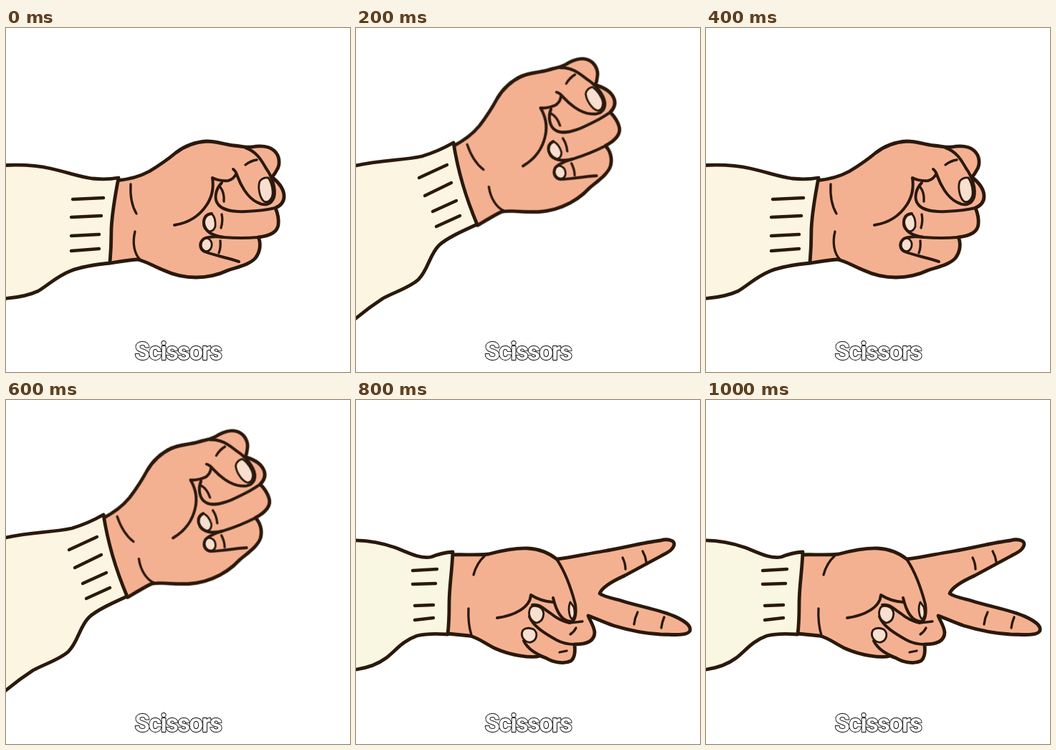
Animation, 480 px wide and 480 px high, one loop 1.2 s. Source, as an HTML page:

```html
<!DOCTYPE html>
<html lang="en">
<head>
<meta charset="utf-8">
<title>Scissors</title>
<style>
html, body { margin: 0; width: 100%; height: 100%; overflow: hidden; background: #fff; }
svg { display: block; width: 100vw; height: 100vh; }
path { fill: none; stroke: #2a190c; stroke-width: 3.3; stroke-linecap: round; stroke-linejoin: round; }
.skin { fill: #f4b192; stroke-width: 4.8; }
.wool { fill: #fcf5e1; stroke-width: 4.8; }
.nail { fill: #f8dfcf; stroke-width: 2.8; }
.bold { stroke-width: 4; }
.thumb { fill: #f4b192; }
.rib { stroke-width: 4.4; }
#open .wool { fill: #f9f6e1; }
#fist { animation: swing 1.2s step-end infinite; }
#low { animation: low 1.2s step-end infinite; }
#high { animation: high 1.2s step-end infinite; }
#open { animation: open 1.2s step-end infinite; }
text {
  font: 700 34.5px Impact, Roboto, sans-serif;
  letter-spacing: -1.6px;
  text-anchor: middle;
  fill: #fff; stroke: #000; stroke-width: 1.8; stroke-linejoin: round; paint-order: stroke;
}
@keyframes swing {
  0%, 33.3333% { transform: none; visibility: visible; }
  16.6667%, 50% { transform: translate(136px, 160.6px) rotate(-22deg) translate(-157px, -209px); visibility: visible; }
  66.6667%, 100% { transform: none; visibility: hidden; }
}
@keyframes low {
  0%, 33.3333% { visibility: visible; }
  16.6667%, 50%, 100% { visibility: hidden; }
}
@keyframes high {
  0%, 33.3333%, 66.6667%, 100% { visibility: hidden; }
  16.6667%, 50% { visibility: visible; }
}
@keyframes open {
  0% { visibility: hidden; }
  66.6667%, 100% { visibility: visible; }
}
</style>
</head>
<body>
<svg viewBox="0 0 480 480">
  <g id="fist">
    <path class="skin" d="M154 213C175 211 189 206 200 200C215 191 225 184 237 174C250 164 265 159 280 158C295 158 305 163 318 164C330 165 335 167 343 166C355 164 367 165 374 171C382 178 383 190 378 198Q375 204 371 208C380 215 388 225 388 235C388 243 383 248 376 251C378 256 381 265 380 274C379 284 370 290 352 292C356 300 355 312 348 321C340 330 325 333 310 338C295 345 280 348 265 348C250 348 235 345 220 338C205 332 195 325 183 323C170 324 158 326 145 328"/>
    <path d="M174 218C173 235 176 249 182 259M180 284C176 300 179 315 187 323"/>
    <path class="bold" d="M235 275C255 272 270 262 280 247C288 235 290 222 288 209Q298 214 310 213Q318 211 322 202"/>
    <path class="bold" d="M301 216C292 225 290 239 296 246C301 253 315 257 335 256Q360 255 376 251"/>
    <path d="M299 222Q305 230 304 242M301 260Q303 269 300 279M299 297Q300 306 297 314"/>
    <path class="nail" d="M287 259C277 260 273 270 277 279C282 286 289 285 292 277Q293 265 287 259Z"/>
    <path class="bold" d="M287 259Q276 260 276 272C277 284 289 290 304 292Q328 294 352 292"/>
    <path class="nail" d="M280 293C271 295 270 304 275 310C282 315 288 308 287 300Q285 294 280 293Z"/>
    <path class="bold" d="M304 292Q285 290 276 294C269 300 270 308 277 312C290 317 307 320 325 326"/>
    <path class="bold thumb" d="M334 167C351 173 357 186 363 196C371 207 377 224 374 236C370 247 361 249 350 243C336 236 327 218 323 207Q321 200 317 197"/>
    <path class="nail" d="M354 214C351 223 354 237 360 242C367 245 373 237 372 227Q371 216 366 209Q358 208 354 214Z"/>
    <path d="M334 191Q342 185 350 184"/>
  </g>
  <g id="low">
    <path class="wool" d="M-10 192C22 190 45 192 62 196C85 201 100 207 120 210Q140 212 157 209C152 235 148 260 147 280Q147 305 145 328C125 330 105 333 90 339C70 347 60 358 45 367C30 374 15 377 -10 378"/>
    <path class="rib" d="M93 239L136 237M91 264L133 262M91 290L130 288M91 311L130 308"/>
  </g>
  <g id="high">
    <path class="wool" d="M-20 197L0 192C35 184 65 185 92 179Q115 172 136 160C142 199 153 236 169 274C147 284 127 293 116 303C102 317 101 337 87 351C75 362 55 368 38 377Q18 390 0 405L-20 420"/>
    <path class="rib" d="M88 209L127 191M96 234L133 216M107 256L140 241M112 277L145 262"/>
  </g>
  <g id="open">
    <path class="skin" d="M132 216C150 215 165 217 185 215C200 211 220 206 240 207C258 208 270 214 280 222C300 220 320 215 345 211C375 206 400 199 425 196C435 193 444 196 444 201C443 210 432 214 425 218C410 226 390 237 375 245C355 254 343 262 340 270C345 274 355 276 370 280C395 288 425 293 445 302C460 309 468 315 466 322C462 330 440 327 425 327C405 326 380 321 360 315C345 310 333 304 324 301C326 307 332 315 333 324C333 335 325 341 305 341C306 350 305 360 300 364C290 369 275 366 265 360L257 357C245 361 215 356 195 347C180 340 170 331 158 329L128 326"/>
    <path class="wool" d="M-8 196C15 195 35 199 55 206C75 214 90 222 105 219Q120 213 135 212C134 240 130 260 130 285Q130 310 128 327C115 326 100 325 85 329C65 336 55 350 42 360C30 369 15 375 -8 377"/>
    <path class="rib" d="M79 238L113 236M79 257L111 256M82 287L108 286M82 307L108 304"/>
    <path d="M180 217Q168 228 164 244M157 291Q156 312 161 328"/>
    <path d="M372 220Q376 228 376 236M400 211Q404 218 405 226M393 296Q389 304 388 313M430 303Q427 310 426 318"/>
    <path class="bold" d="M197 304C220 301 243 290 244 272Q258 281 275 282"/>
    <path class="bold" d="M246 286C257 284 262 292 272 298Q284 308 298 311"/>
    <path d="M298 311L316 309M299 327Q304 324 307 318M284 352L294 350"/>
    <path class="bold" d="M242 302C247 316 264 326 280 335Q291 341 306 341M234 336C240 348 251 354 265 360"/>
    <path class="nail" d="M244 289C238 299 244 309 252 311C262 309 264 297 259 291Q251 285 244 289Z"/>
    <path class="nail" d="M233 321C228 330 236 339 244 338C253 335 254 325 248 320Q239 316 233 321Z"/>
    <path class="bold thumb" d="M280 222C292 240 300 262 306 285C308 300 305 309 300 309C288 309 280 297 275 276"/>
    <path class="nail" d="M299 282C295 291 298 304 302 306Q307 301 304 289Z"/>
  </g>
  <text x="240" y="463">Scissors</text>
</svg>
</body>
</html>
```
